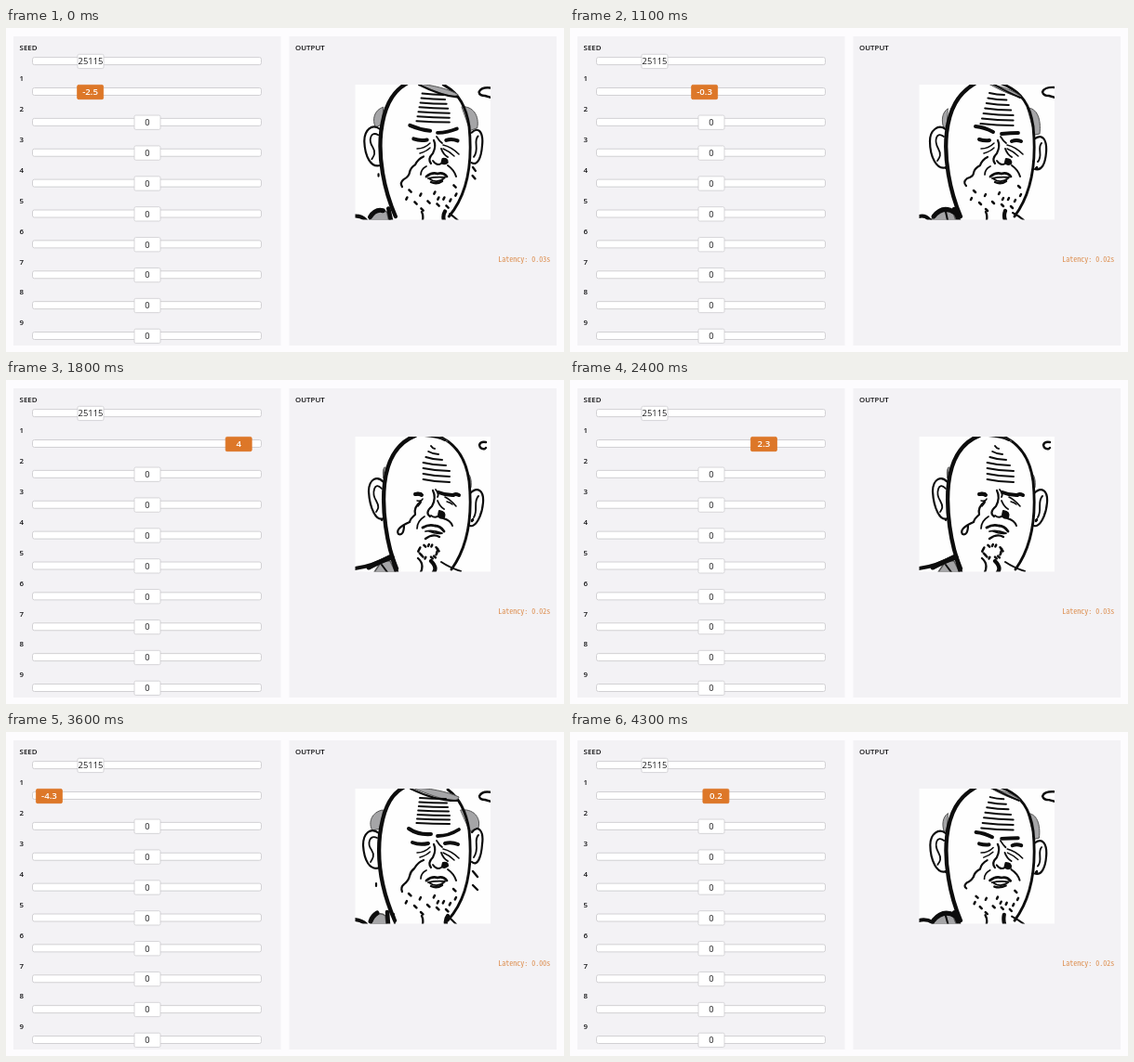
An HTML page for the animation above (4400 ms loop, 600 px wide and 349 px high).

```html
<!DOCTYPE html>
<html lang="en">
<head>
<meta charset="utf-8">
<title>Seed sliders</title>
<style>
  html, body { margin: 0; width: 100%; height: 100%; overflow: hidden; background: #fdfcfe; }
  svg { display: block; width: 600px; height: 349px; }
  text { font-family: "Open Sans", "Noto Sans", sans-serif; }
  .label { font-size: 7.9px; font-weight: 600; fill: #111113; }
  .value { font-size: 9.4px; fill: #1c1c1e; text-anchor: middle; }
  .active { font-size: 9.7px; font-weight: 600; fill: #fff; }
  .latency { font: 8px "Noto Sans Mono CJK JP", "Noto Sans Mono CJK SC", monospace; fill: #dc8a48; text-anchor: end; }
  .ink { fill: none; stroke: #0d0d0d; stroke-linecap: round; stroke-linejoin: round; }
</style>
</head>
<body>
<svg id="stage" viewBox="0 0 600 349">
  <defs><clipPath id="frame"><rect x="375.5" y="61" width="145.5" height="145.5"/></clipPath></defs>
</svg>
<script>
const LOOP = 4400, STEP = 100;
const stage = document.getElementById('stage');

function add(parent, tag, attrs, text) {
  const el = document.createElementNS('http://www.w3.org/2000/svg', tag);
  for (const key in attrs) el.setAttribute(key, attrs[key]);
  if (text !== undefined) el.textContent = text;
  return parent.appendChild(el);
}

const clamp = x => Math.max(0, Math.min(1, x));
const smooth = x => { x = clamp(x); return x * x * (3 - 2 * x); };
const mix = (a, b, t) => a + (b - a) * t;

// Blends the numbers of two paths that share the same commands.
function mixPath(a, b, t) {
  const ends = b.match(/-?[\d.]+/g);
  let i = 0;
  return a.replace(/-?[\d.]+/g, n => mix(+n, +ends[i++], t).toFixed(2));
}

// Panels and sliders
add(stage, 'rect', { x: 8, y: 9, width: 287.5, height: 333, fill: '#f3f2f5' });
add(stage, 'rect', { x: 304.5, y: 9, width: 287.5, height: 333, fill: '#f3f2f5' });
add(stage, 'text', { x: 311, y: 24.4, class: 'label' }, 'OUTPUT');

function slider(row, label, x, value, active) {
  const y = 35.6 + row * 32.88;
  add(stage, 'text', { x: 14.6, y: y - 11.2, class: 'label' }, label);
  add(stage, 'rect', { x: 28.5, y: y - 4, width: 246, height: 8, rx: 2, fill: '#fff', stroke: '#cdccd0', 'stroke-width': .9 });
  const knob = add(stage, 'g', { transform: `translate(${x} ${y})` });
  add(knob, 'rect', {
    x: -14, y: -7.3, width: 28, height: 15.3, rx: 1.5, 'stroke-width': .8,
    fill: active ? '#dd7728' : '#fff', stroke: active ? '#dd7728' : '#cdccd0'
  });
  const text = add(knob, 'text', { y: 3.7, class: active ? 'value active' : 'value' }, value);
  return { knob, text, y };
}

slider(0, 'SEED', 91, '25115');
const dragged = slider(1, '1', 152, '0', true);
for (let row = 2; row < 10; row++) slider(row, row, 152, '0');

const latency = add(stage, 'text', { x: 585.3, y: 251.8, class: 'latency' });

// Portrait: every part has a neutral pose, a high pose and optionally a low pose
const face = add(stage, 'g', { 'clip-path': 'url(#frame)' });
add(face, 'rect', { x: 375, y: 61, width: 147, height: 146, fill: '#fefefe' });
const parts = [];

function part(width, mid, high, low, style = '') {
  const el = add(face, 'path', { class: 'ink', 'stroke-width': width, style });
  parts.push({ el, mid, high: high || mid, low: low || mid });
}

const grey = 'fill:#a5a5a7;stroke:#555', black = 'fill:#0d0d0d';

// Hair and ears
part(1, 'M406 87C400 91 399 100 402 108L405 104Z', 'M407 94C405 96 405 101 406 106L406 104Z', 'M405 84C393 86 389 98 394 106L403 104Z', grey);
part(1, 'M492 86C502 86 507 98 505 114L500 115Z', 'M497 101C499 102 501 108 500 116L499 117Z', 'M489 84C502 82 511 92 508 103L499 107Z', grey);
part(2.2, 'M404 109C396 103 387 110 387 122C387 138 394 154 405 150', 'M406 110C399 102 390 107 390 120C391 138 398 153 406 149', 'M401 109C392 102 384 109 384 122C385 138 391 150 402 146');
part(1.8, 'M402 117C394 111 391 121 396 130C400 137 397 140 395 143', 'M404 117C396 108 393 122 398 130C402 137 400 139 398 142', 'M399 114C391 110 388 120 393 127C397 133 394 137 392 140');
part(2.2, 'M500 119C509 113 513 122 512 134C511 147 507 154 500 152', 'M499 122C507 114 514 119 513 132C512 146 505 159 499 157', 'M501 108C508 99 514 107 512 121C511 135 507 145 501 140');
part(1.9, 'M507 124C502 129 509 138 503 144', 'M508 125C502 131 508 140 503 148', 'M508 111C502 117 510 125 503 135');

// Skull
part(4.3, 'M420 203C408 175 402 140 405 113C408 87 417 71 435 60', 'M420 203C409 178 404 138 407 112C410 85 420 68 440 60', 'M418 203C404 171 399 139 402 111C405 88 411 69 427 60');
part(2.9, 'M464 60C486 68 495 84 498 106C502 146 495 180 478 203', 'M464 60C486 69 495 87 498 109C502 149 495 182 479 204', 'M475 62C489 72 495 87 498 106C502 146 496 180 475 203');
part(1, 'M450 60C466 63 478 68 485 74C479 74 468 70 450 60Z', 'M460 60C465 61 470 63 475 66C470 65 465 62 460 60Z', 'M437 60C454 60 474 64 487 70C486 75 477 77 437 60Z', grey);
part(2, 'M456 61Q472 70 484 75', 'M450 60Q464 61 472 65', 'M435 61Q464 75 486 74');

// Forehead wrinkles
for (let i = 0; i < 7; i++) {
  const line = (y, from, to, slope) => `M${from} ${y}Q${(from + to) / 2} ${y + slope} ${to} ${y + slope}`;
  part(2, line(70 + i * 5.5, 451 - i * 1.6, 467 + Math.min(i, 4) * 2.4, 2),
    line(71 + i * 6, 457 - Math.min(i, 3) * 2.8, 461 + Math.min(i, 4) * 4, 3),
    line(71 + i * 4.5, 445 - i * .6, 473 + Math.min(i, 4), 1));
}

// Brows and eyes
part(4, 'M436 106Q446 107 455 112', 'M441 123Q443 122 446 123', 'M433 104Q443 111 457 110');
part(3.8, 'M464 114Q474 113 482 113', 'M465 121Q472 124 480 124', 'M464 112Q476 112 487 105');
part(4, 'M440 120Q446 122 451 121', 'M440 123Q444 122 447 124', 'M437 119Q445 122 454 120');
part(4, 'M475 122Q480 120 485 122', 'M481 124Q483 122 487 124', 'M472 120Q479 118 486 121');
part(1.5, 'M442 130Q450 130 456 124', 'M442 130Q447 131 448 128');
part(1.5, 'M445 135Q452 133 456 129', 'M443 136Q445 134 446 132');
part(1.6, 'M470 126Q479 128 487 136', 'M472 126Q478 129 484 136');
part(1.5, 'M470 130Q477 133 482 138', 'M474 131Q478 132 480 134');
part(1.8, 'M463 117Q466 122 469 124', 'M462 118Q466 123 464 126');

// Nose
part(2.2, 'M460 121Q463 127 459 135Q453 141 457 146', 'M459 119Q463 127 458 136Q450 143 456 147');
part(1.9, 'M459 143Q463 149 468 146', 'M457 146Q462 150 467 145');
part(2.2, 'M469 141Q475 141 474 146Q470 148 468 145Z', 'M466 141Q473 142 471 148Q467 150 465 146Z', 'M470 141Q475 140 475 144Q472 147 469 145Z', black);
part(1.9, 'M468 130Q470 136 475 139', 'M464 130Q467 137 471 139');

// Cheeks and tear
part(2.2, 'M449 139Q443 142 441 148Q435 151 434 156', 'M446 131Q438 137 440 145Q435 149 434 153', 'M449 138Q443 140 439 147Q435 150 434 155');
part(2.2, 'M434 156Q434 160 427 162Q422 166 426 170', 'M434 153Q418 160 422 166Q428 168 428 156', 'M434 155Q433 160 428 164Q424 167 426 172');
part(2, 'M475 148Q482 153 484 160', 'M470 149Q478 151 480 157');
part(1.7, 'M452 149Q446 152 446 158', 'M450 147Q442 152 442 160');

// Mouth
part(2.8, 'M452 160Q458 155 464 157Q470 155 474 160', 'M448 159Q455 155 461 157Q467 157 471 163');
part(1.8, 'M454 162Q463 160 472 161Q464 168 456 163', 'M451 163Q459 161 469 165Q462 166 455 163');
part(2.4, 'M457 166Q463 169 469 165', 'M451 171Q459 165 466 169');

// Stubble gathers into a small beard
const stubble = [[432, 183], [440, 188], [447, 179], [454, 187], [462, 177], [464, 190], [472, 183], [482, 170], [479, 185], [447, 195], [485, 179], [434, 175], [466, 183], [474, 192]];
stubble.forEach(([x, y], i) => {
  const angle = i * 2.4, bx = 454 + Math.cos(angle) * 10, by = 184 + Math.sin(angle) * 7;
  const dash = (px, py, size) => `M${px} ${py}L${px + size * (i % 2 ? 2 : -1)} ${py + size * 2}`;
  part(2.5, dash(x, y, 1), dash(bx, by, .9), dash(x - 1, y - 1, 1.2));
});

// Drops below the ears, hidden behind the ear line except in the low pose
part(2.4, 'M502 150L502 151', '', 'M502 150Q507 156 502 160');
part(2.4, 'M501 151L501 152', '', 'M502 165Q507 170 501 174');
part(2.2, 'M404 150L404 151', '', 'M398 163L398 166');

// Neck, collar and corner curl
part(1.5, 'M388 207L394 198Q402 191 412 199L415 207Z', 'M396 207L402 198Q406 194 413 195L419 207Z', 'M392 207L395 199Q402 193 408 198L409 207Z', grey);
part(4, 'M375 203Q382 201 387 207', 'M375 203Q393 201 413 190', 'M375 202Q383 203 387 207');
part(5, 'M391 203Q401 190 414 199', 'M390 202Q405 194 415 191', 'M392 204Q394 198 399 195');
part(4.5, 'M413 195L418 207', 'M415 190L420 207', 'M410 194L411 207');
part(2, 'M404 198L406 207', 'M404 199L410 207', 'M417 196L418 207');
part(2.3, 'M447 198Q449 202 448 207', 'M443 192Q450 198 446 207');
part(4.2, 'M468 197Q466 202 468 207', 'M457 195Q464 202 460 207', 'M475 198Q472 202 473 207');
part(2, 'M476 199Q482 202 488 207', 'M468 196Q477 202 489 206', 'M478 201Q481 204 484 207');
part(2.4, 'M522 64Q510 63 508 69Q509 73 515 73L522 75', 'M516 67Q510 66 509 70Q510 75 515 74L516 73', 'M522 65Q512 63 509 69Q509 73 515 73L522 75');

const valueKeys = [[0, -2.5], [300, -4.5], [600, -3.7], [1100, -.3], [1800, 4], [2400, 2.3], [3000, -3.8], [3200, -4.8], [3400, -4.3], [3600, -4.3], [4300, .2]];
const latencyKeys = [[0, .03], [300, .02], [700, .03], [1000, .02], [2100, .03], [2700, .02], [3000, .1], [3100, .03], [3600, 0], [3700, .02]];

function valueAt(time) {
  const next = valueKeys.findIndex(key => key[0] >= time);
  if (next === 0) return valueKeys[0][1];
  const [t0, v0] = valueKeys[next - 1], [t1, v1] = valueKeys[next];
  return mix(v0, v1, (time - t0) / (t1 - t0));
}

function render(time) {
  const value = Math.round(valueAt(time) * 10) / 10 || 0;
  dragged.knob.setAttribute('transform', `translate(${152 + value * 24.55} ${dragged.y + .2})`);
  dragged.text.textContent = value;
  latency.textContent = `Latency: ${latencyKeys.filter(key => key[0] <= time).pop()[1].toFixed(2)}s`;

  const high = smooth((value + .3) / 2.4);
  const low = smooth((-value - .3) / 4);
  for (const p of parts) {
    p.el.setAttribute('d', value > 0 ? mixPath(p.mid, p.high, high) : mixPath(p.mid, p.low, low));
  }
}

const start = performance.now();
let shown = -1;
function tick() {
  const time = Math.floor((performance.now() - start) % LOOP / STEP) * STEP;
  if (time !== shown) render(shown = time);
  requestAnimationFrame(tick);
}
tick();
</script>
</body>
</html>
```
